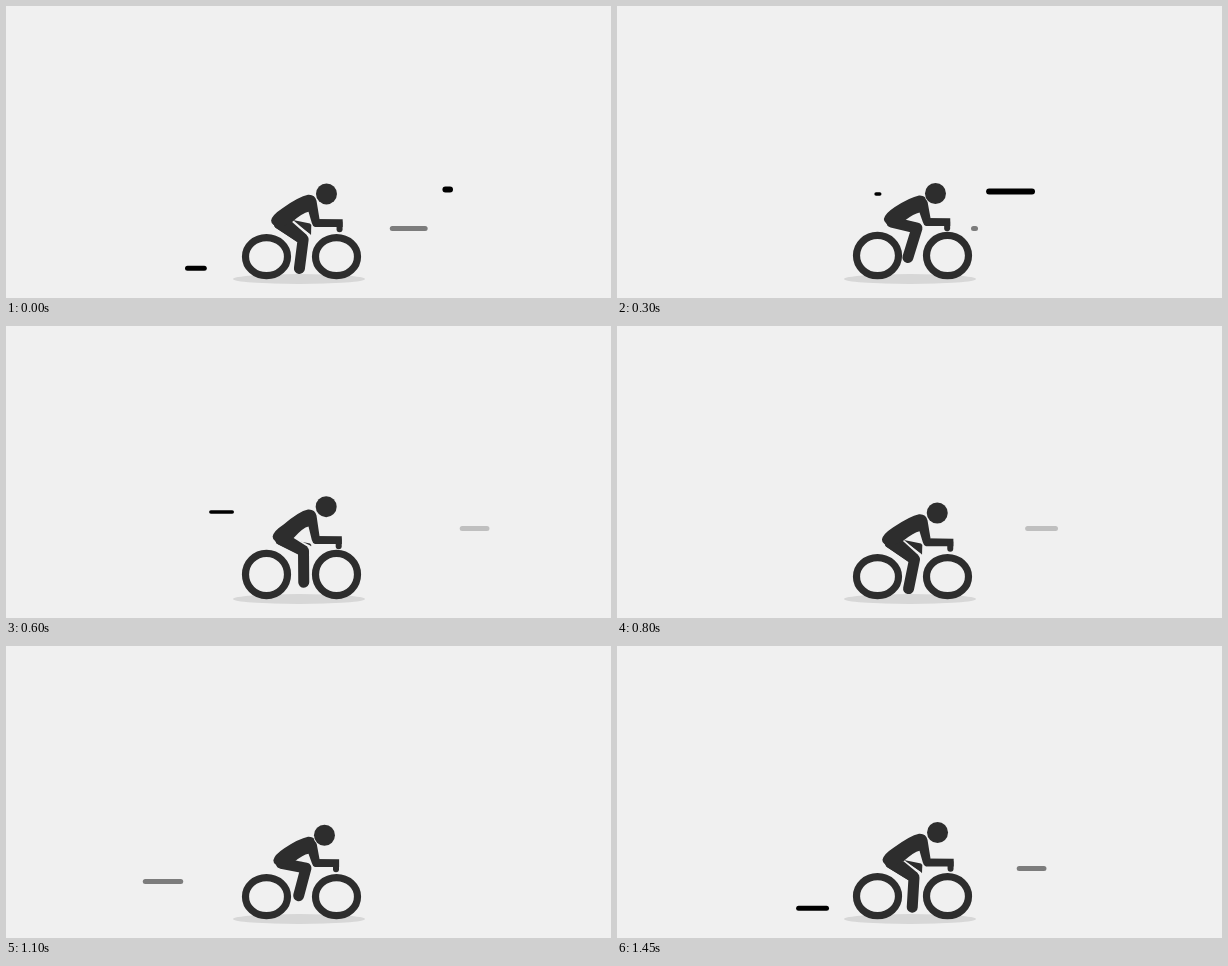
An HTML page with a canvas for the animation above (1500 ms loop, 605 by 292 pixels).

```html
<!DOCTYPE html>
<html lang="en">
<head>
<meta charset="utf-8">
<title>Cyclist</title>
<style>
html, body { margin: 0; width: 100%; height: 100%; overflow: hidden; background: #f0f0f0; }
canvas { display: block; width: 605px; height: 292px; }
</style>
</head>
<body>
<canvas id="stage" width="605" height="292"></canvas>
<script>
const ctx = document.getElementById('stage').getContext('2d');
const LOOP = 1500, STEP = 50, PEDAL = 750;
const PAPER = '#f0f0f0', INK = '#2d2d2d', GRAY = '#7c7c7c', PALE = '#bfbfbf';
const STREAK_LENGTH = 75.5;

// x is the right edge at birth, y drifts by rise
const STREAKS = [
  { start: 0, x: 447, y: 183.5, rise: 2, width: 6, scale: 0.954, lag: 70 },
  { start: 300, x: 264.5, y: 188, rise: -2, width: 3.5, scale: 0.768 },
  { start: 500, x: 488.5, y: 202.5, color: PALE },
  { start: 850, x: 212.5, y: 235.5, color: GRAY },
  { start: 1150, x: 259.5, y: 262.2 },
  { start: 1350, x: 434.5, y: 221, rise: 1.5, color: GRAY }
];

// Sine ease in and out between two times.
function ease(time, from, to) {
  const k = Math.min(1, Math.max(0, (time - from) / (to - from)));
  return (1 - Math.cos(Math.PI * k)) / 2;
}

// Swing with its peak at the given time, once or more per pedal turn.
function swing(time, peak, turns = 1) {
  return Math.cos(2 * Math.PI * turns * (time - peak) / PEDAL);
}

function strokeLine(points, width, color) {
  ctx.beginPath();
  points.forEach(p => ctx.lineTo(...p));
  ctx.lineWidth = width;
  ctx.strokeStyle = color;
  ctx.lineCap = ctx.lineJoin = 'round';
  ctx.stroke();
}

function fillShape(points) {
  ctx.beginPath();
  points.forEach(p => ctx.lineTo(...p));
  ctx.closePath();
  ctx.fill();
}

function fillEllipse(x, y, rx, ry, color) {
  ctx.beginPath();
  ctx.ellipse(x, y, rx, ry, 0, 0, Math.PI * 2);
  ctx.fillStyle = color;
  ctx.fill();
}

function drawStreak({ start, x, y, rise = 0, width = 5, scale = 1, lag = 0, color = '#000' }, time) {
  const age = (time - start + LOOP) % LOOP;
  if (age >= 500 + lag) return;
  const length = STREAK_LENGTH * scale;
  const origin = x - width / 2;
  const lead = origin - length * ease(age, -60, 310);
  const tail = origin - length * ease(age - lag, 20, 500);
  const rowY = y + rise * Math.min(1, age / 100);
  strokeLine([[lead, rowY], [tail, rowY]], width, color);
}

// The tyres flatten against the ground twice per pedal turn.
function drawWheels(time) {
  const top = Math.min(228, 226.9 + 3.2 * swing(time, 40, 2));
  const ry = (273.3 - top) / 2;
  for (const x of [260.5, 330.5]) {
    ctx.beginPath();
    ctx.ellipse(x, top + ry, 21, ry - 3.6, 0, 0, Math.PI * 2);
    ctx.lineWidth = 7.2;
    ctx.strokeStyle = INK;
    ctx.stroke();
  }
}

function poseAt(time) {
  const bob = swing(time, -5, 2);
  return {
    headX: 319.5 - 1.05 * swing(time, 330),
    headY: 184.8 + 3.8 * bob + 1.3 * swing(time, 250),
    shoulderY: 187 + 2.8 * bob + 1.5 * swing(time, 270),
    hipX: 266.3 + 1.4 * swing(time, 440),
    hipY: 212.2 + 2.2 * bob,
    handX: 334.9 - 1.8 * swing(time, 350),
    handY: 215.3 + 1.7 * bob,
    kneeX: 298.5 + 1.5 * swing(time, 325),
    kneeY: 226.2 + 5.8 * swing(time, 25) + 1.8 * swing(time, 25, 2),
    footX: 293.5 + 4.5 * swing(time, 560),
    footY: 255.8 + 6.9 * swing(time, 30)
  };
}

function drawRider(time) {
  const { headX, headY, shoulderY, hipX, hipY, handX, handY, kneeX, kneeY, footX, footY } = poseAt(time);
  const crotch = [hipX + 21, hipY + 1.5];
  const kneeTop = [kneeX + 4, kneeY - 4.2];

  // far thigh, parted from the near one by a thin light gap
  ctx.fillStyle = INK;
  fillShape([[287, 214], [304, 217.5], [305.3, 219], [305, kneeTop[1]]]);
  strokeLine([[crotch[0], crotch[1] + 1], [kneeTop[0] + 2, kneeTop[1]]], 3, PAPER);

  // near leg
  ctx.fillStyle = INK;
  fillShape([[hipX + 1, hipY], crotch, kneeTop, [kneeX - 4, kneeY + 3.5], [hipX + 4, hipY + 7]]);
  strokeLine([[hipX + 8, hipY + 3], [kneeX, kneeY], [footX, footY]], 11, INK);

  // torso and upper arm
  ctx.beginPath();
  ctx.moveTo(hipX, hipY);
  ctx.quadraticCurveTo(hipX + 1, hipY - 5.5, hipX + 11, hipY - 12);
  ctx.quadraticCurveTo(293, shoulderY + 1.8, 302, shoulderY);
  ctx.quadraticCurveTo(309, shoulderY - 0.5, 310.5, shoulderY + 6);
  ctx.lineTo(313.5, handY - 4);
  ctx.lineTo(309, handY + 4);
  ctx.quadraticCurveTo(306.5, handY + 3, 305.8, handY);
  ctx.lineTo(302.5, shoulderY + 17);
  ctx.quadraticCurveTo(297, shoulderY + 18, crotch[0], crotch[1]);
  ctx.lineTo(hipX + 9, hipY + 7);
  ctx.quadraticCurveTo(hipX, hipY + 5, hipX, hipY);
  ctx.fill();

  // forearm and hand
  fillShape([[308, handY - 4], [handX, handY - 3.7], [handX, handY + 4], [309, handY + 4]]);
  strokeLine([[handX - 3.1, handY], [handX - 3.1, handY + 6.3]], 6, INK);

  fillEllipse(headX, headY, 11.2, 11.2, PAPER);
  fillEllipse(headX, headY, 10.5, 10.5, INK);
}

function draw(now) {
  const time = Math.floor((now % LOOP) / STEP) * STEP;
  ctx.fillStyle = PAPER;
  ctx.fillRect(0, 0, 605, 292);
  fillEllipse(293, 273, 66, 5, '#d7d7d7');
  STREAKS.forEach(s => drawStreak(s, time));
  drawRider(time);
  drawWheels(time);
}

const begin = performance.now();
function tick() {
  draw(performance.now() - begin);
  requestAnimationFrame(tick);
}
tick();
</script>
</body>
</html>
```
